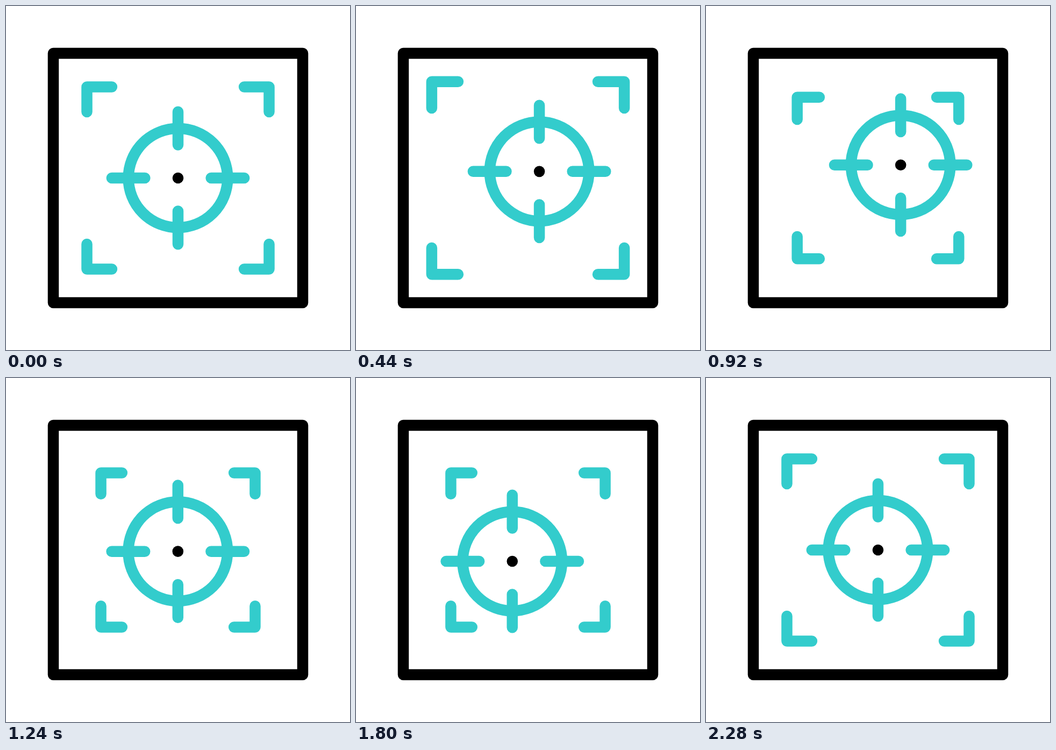
These frames come from a looping animation (640x640 px, 2.52 s). An HTML page:

```html
<!DOCTYPE html>
<html lang="en">
<head>
<meta charset="utf-8">
<title>Focus target</title>
<style>
  html, body { margin: 0; width: 100%; height: 100%; overflow: hidden; background: #fff; }
  svg { display: block; width: 100vw; height: 100vh; }
  .line { fill: none; stroke: #3cc; stroke-width: 20.5; stroke-linecap: round; stroke-linejoin: round; }
  .frame { stroke: #000; }
</style>
</head>
<body>
<svg viewBox="-320 -320 640 640">
  <rect class="line frame" x="-232" y="-232" width="464" height="464"/>
  <g id="corners"></g>
  <g id="sight">
    <circle class="line" r="92.3"/>
    <path class="line" d="M0-123.2V-61.6M0 61.6V123.2M-123.2 0H-61.6M61.6 0H123.2"/>
    <circle r="10.3"/>
  </g>
</svg>
<script>
  const LOOP = 2520, STEP = 40;
  const corners = document.getElementById('corners');
  const sight = document.getElementById('sight');

  // One corner, turned into all four
  for (let turn = 0; turn < 360; turn += 90) {
    const path = document.createElementNS('http://www.w3.org/2000/svg', 'path');
    path.setAttribute('class', 'line');
    path.setAttribute('transform', `rotate(${turn})`);
    corners.append(path);
  }

  // cubic-bezier(.6, 0, .4, 1), solved for x by bisection
  function ease(x) {
    let lo = 0, hi = 1;
    for (let i = 0; i < 24; i++) {
      const m = (lo + hi) / 2, n = 1 - m;
      if (1.8 * m * n * n + 1.2 * m * m * n + m ** 3 < x) lo = m; else hi = m;
    }
    return lo * lo * (3 - 2 * lo);
  }

  // Eased progress, 0 before the move and 1 after it
  const move = (t, from, to) => ease(Math.min(1, Math.max(0, (t - from) / (to - from))));

  function placeSight(t) {
    const [out, across, home] = [0, 1, 2].map(i => move(t, 160 + 780 * i, 720 + 780 * i));
    const right = out - across, left = across - home;
    sight.setAttribute('transform',
      `translate(${42.2 * right - 29.9 * left} ${-24.3 * right + 21.5 * left})`);
  }

  function placeCorners(t) {
    const d = 169.5
      + 12.2 * move(t, 160, 600)
      - 37.7 * move(t, 600, 1080)
      - 4 * move(t, 1080, 1600)
      + 29.5 * move(t, 1600, 2280);
    const tip = d * 0.726;
    for (const path of corners.children) {
      path.setAttribute('d', `M${-tip} ${-d}H${-d}V${-tip}`);
    }
  }

  let start;
  function tick(now) {
    start ??= now;
    const t = Math.floor(((now - start) % LOOP) / STEP) * STEP;
    placeSight(t);
    placeCorners(t);
    requestAnimationFrame(tick);
  }
  tick(performance.now());
</script>
</body>
</html>
```
